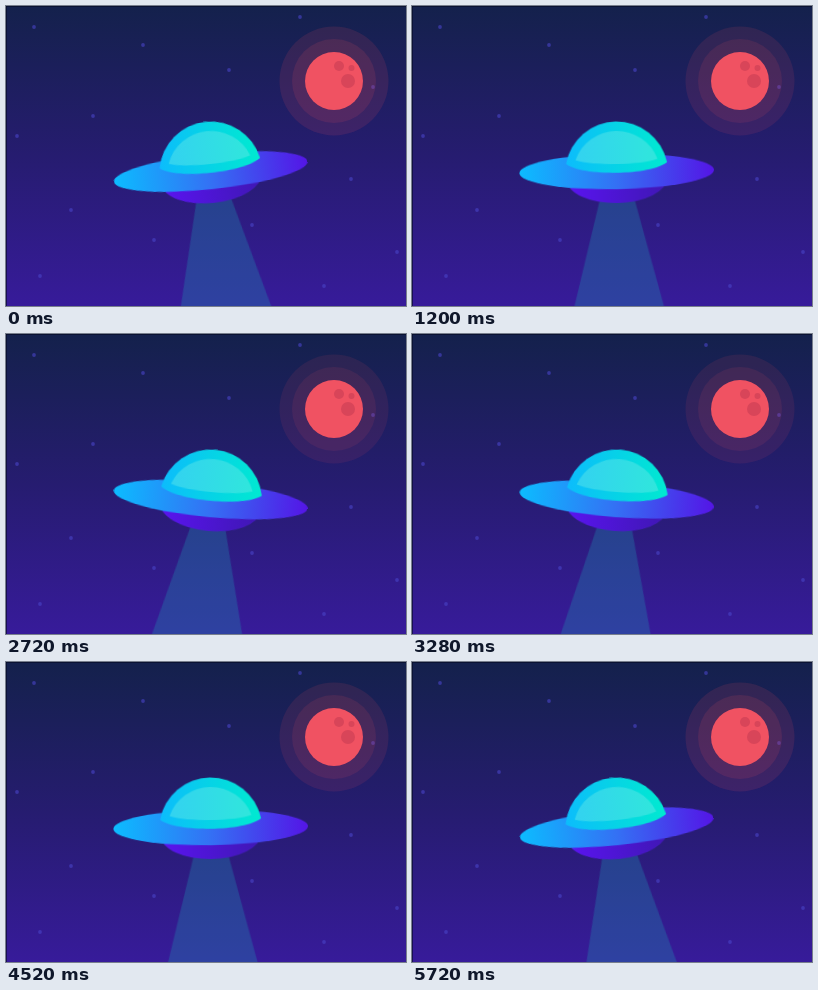
Write an HTML page that moves like this. It is 400 px wide and 300 px high and loops after 5760 ms.

```html
<!DOCTYPE html>
<html lang="en">
<head>
<meta charset="utf-8">
<title>Flying saucer</title>
<style>
  html, body { margin: 0; width: 100%; height: 100%; overflow: hidden; background: #14214c; }
  svg { display: block; width: 100vw; height: 100vh; }
  .ship {
    transform-origin: 204.7px 165.5px;
    animation: sway 2880ms linear infinite alternate;
  }
  .halo { animation: dim 2880ms linear infinite alternate; }
  @keyframes sway {
    from { transform: rotate(-6deg); }
    to { transform: rotate(6deg); }
  }
  @keyframes dim {
    from { opacity: 1; }
    to { opacity: .75; }
  }
</style>
</head>
<body>
<svg viewBox="0 0 400 300" preserveAspectRatio="none">
  <defs>
    <linearGradient id="sky" x2="0" y2="1">
      <stop stop-color="#14214c"/>
      <stop offset=".5" stop-color="#261c70"/>
      <stop offset="1" stop-color="#371b9a"/>
    </linearGradient>
    <linearGradient id="disc">
      <stop stop-color="#0cbcff"/>
      <stop offset=".5" stop-color="#3470f4"/>
      <stop offset="1" stop-color="#5415e6"/>
    </linearGradient>
    <linearGradient id="belly">
      <stop stop-color="#5a14f0"/>
      <stop offset="1" stop-color="#3f17b4"/>
    </linearGradient>
    <linearGradient id="dome">
      <stop stop-color="#0cbcfc"/>
      <stop offset="1" stop-color="#00ead0"/>
    </linearGradient>
    <linearGradient id="glass">
      <stop stop-color="#33d2f0"/>
      <stop offset="1" stop-color="#30e6dc"/>
    </linearGradient>
  </defs>

  <rect width="400" height="300" fill="url(#sky)"/>

  <g id="stars" fill="#4a45c8" fill-opacity=".6"></g>

  <g class="halo" fill="#f05060">
    <circle cx="328" cy="75" r="54.5" fill-opacity=".13"/>
    <circle cx="328" cy="75" r="42" fill-opacity=".13"/>
  </g>
  <circle cx="328" cy="75" r="29" fill="#f05262"/>
  <g fill="#d84559">
    <circle cx="333" cy="60" r="5"/>
    <circle cx="345.5" cy="62" r="3"/>
    <circle cx="342" cy="75" r="7"/>
  </g>

  <g class="ship">
    <path d="M194.7 165H214.7L257.1 330H152.3Z" fill="#1e88b0" fill-opacity=".35"/>
    <ellipse cx="204.7" cy="173" rx="50" ry="24" fill="url(#belly)"/>
    <ellipse cx="204.7" cy="165.5" rx="97.3" ry="17.7" fill="url(#disc)"/>
    <path d="M154.2 157A51.5 51.5 0 0 1 255.2 157C239 170 170 170 154.2 157Z" fill="url(#dome)"/>
    <path d="M163.7 153.5A43.7 43.7 0 0 1 245.7 153.5C230 159.5 180 159.5 163.7 153.5Z" fill="url(#glass)"/>
  </g>

  <path d="M0 .5H400M.5 0V300" stroke="#060b24" stroke-opacity=".6"/>
</svg>
<script>
  const stars = [
    [28, 21], [137, 39], [294, 11], [223, 64], [87, 110], [11, 130], [65, 204],
    [148, 234], [246, 219], [345, 173], [34, 270], [318, 280], [391, 246], [367, 81]
  ];
  document.getElementById('stars').innerHTML =
    stars.map(([x, y]) => `<circle cx="${x}" cy="${y}" r="1.9"/>`).join('');
</script>
</body>
</html>
```
